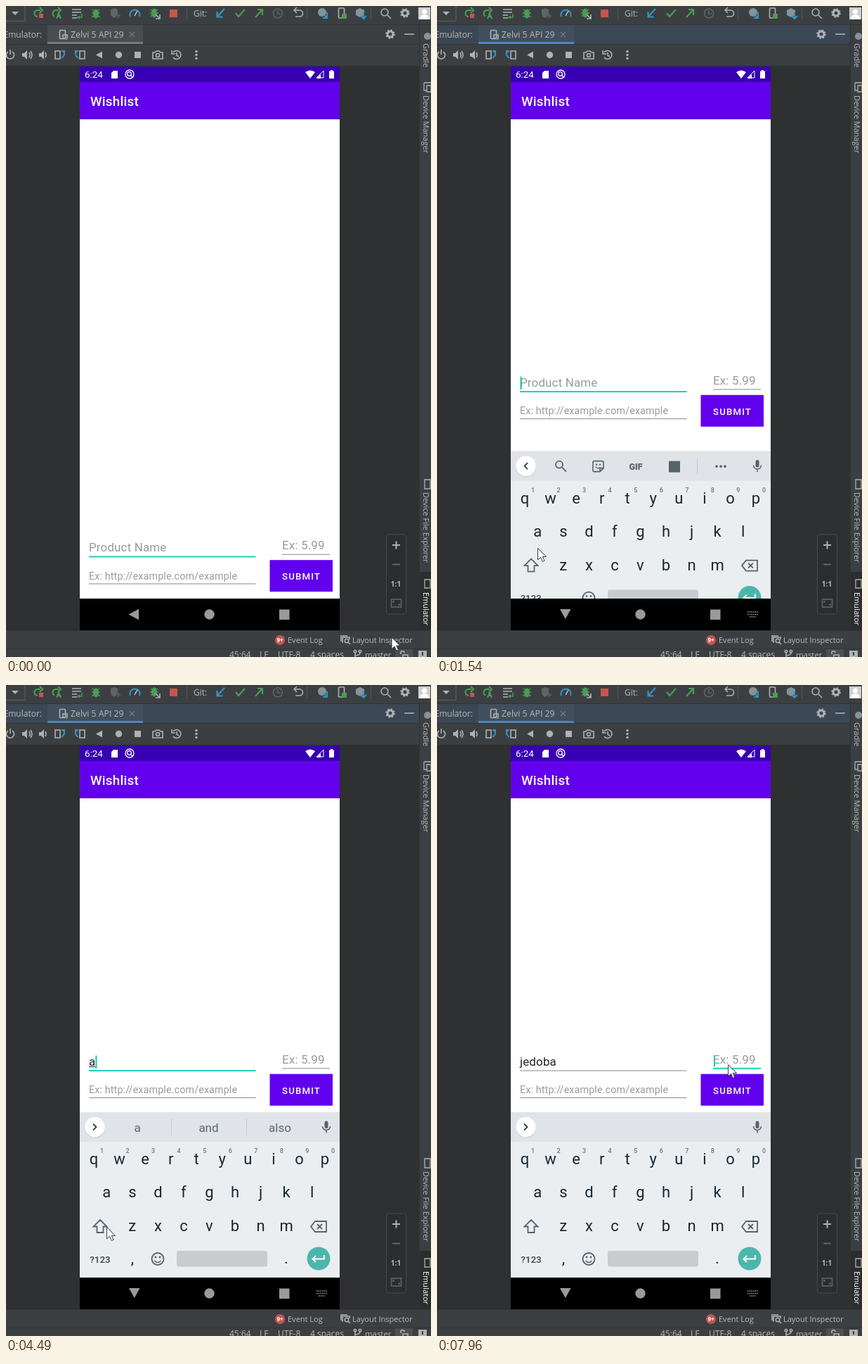
These frames come from a looping animation (605x925 px, 8 s). An HTML page:

```html
<!DOCTYPE html>
<html lang="en">
<head>
<meta charset="utf-8">
<title>Wishlist in an emulator</title>
<style>
html, body { margin: 0; width: 100%; height: 100%; overflow: hidden; background: #2e3031; }
svg { display: block; width: 605px; height: 925px; }
text { white-space: pre; }
.ide { font: 12px "Open Sans", "Noto Sans", sans-serif; fill: #bbb; }
.small { font-size: 11px; }
.app { font: 16.95px Roboto, sans-serif; letter-spacing: .009375em; }
.hint { fill: #9a9a9a; }
.key { font: 22px Roboto, sans-serif; fill: #18262f; text-anchor: middle; }
.num { font: 500 9px Roboto, sans-serif; fill: #6a747b; text-anchor: middle; }
.sug { font: 17px Roboto, sans-serif; fill: #5b666d; text-anchor: middle; }
.line { fill: none; stroke: #afb1b3; stroke-width: 1.6; }
.green { stroke: #499c54; stroke-width: 2; }
.blue { stroke: #3592c4; stroke-width: 2; }
.dim { stroke: #616365; }
.solid { fill: #afb1b3; }
.kb { fill: none; stroke: #56626a; stroke-width: 1.8; }
</style>
</head>
<body>
<svg viewBox="0 0 605 925">
  <rect width="605" height="925" fill="#2e3031"/>

  <!-- main toolbar -->
  <rect width="605" height="26" fill="#3c3f41"/>
  <path d="M0 21.5H27V0" class="line" style="stroke:#5e6162;stroke-width:1"/>
  <path d="M8 8h10l-5 5z" class="solid"/>
  <g class="line green">
    <path d="M49 6h-4a4.5 4.5 0 0 0 0 9M48 2l4 4-4 4M75 6h-4a4.5 4.5 0 0 0-2 8.500M74 2l4 4-4 4M72 18l3-8 3 8M73 15h4"/>
    <path d="M123 5l3 2M133 5l-3 2M122 10h12M122 15h12M206 5l3 2M216 5l-3 2M205 10h12M206 14h4" stroke-width="1.500"/>
  </g>
  <rect x="47" y="11" width="6" height="6" fill="#c75450"/>
  <path d="M94 5h13M94 9h13M94 13h7M94 17h7" class="line"/>
  <path d="M108 11v5h-5M105 14l-3 2 3 2" class="line green" style="stroke-width:1.500"/>
  <ellipse cx="128" cy="11" rx="4" ry="6.500" fill="#499c54"/>
  <path d="M149 5l5-2 5 2v5q-1 5-5 7-5-2-5-7z" fill="#616365"/><path d="M158 10l6 4-6 4z" fill="#55585a"/>
  <path d="M177 15a7 7 0 1 1 13 0" class="line blue"/><path d="M183 14l4-7" class="line"/>
  <ellipse cx="211" cy="10" rx="4" ry="6.500" fill="#499c54"/>
  <path d="M219 12v6h-6M219 18l-6-6" class="line"/>
  <rect x="233" y="5" width="11" height="11" fill="#c75450"/>
  <path d="M257.500 2v17M428.500 2v17M519.500 2v17" stroke="#55585a"/>
  <text class="ide" x="267" y="15">Git:</text>
  <path d="M311 4l-10 11M300.500 8v7.500h8" class="line blue" style="stroke-width:2.200"/>
  <path d="M327 10l4 5 9-10M355 16l10-11M358 5h7v8" class="line green" style="stroke-width:2.200"/>
  <g class="line dim"><circle cx="387" cy="10.500" r="6.500"/><path d="M387 6v5h4"/></g>
  <path d="M412 15h6a4 4 0 0 0 0-9h-7M414 2l-4 4 4 4" class="line"/>
  <circle cx="450" cy="9" r="6" fill="#87939a"/><path d="M457 9v8h-6M457 17l-5-5" class="line blue"/>
  <rect x="473.500" y="3" width="8" height="14" rx="1" class="line"/><rect x="478" y="11" width="7" height="7" fill="#499c54"/>
  <path d="M498 6l6-3 6 3v7l-6 3-6-3z" fill="#87939a"/><path d="M509 9v9M505 14l4 4 4-4" class="line blue"/>
  <g class="line" stroke-width="2"><circle cx="539" cy="9" r="5"/><path d="M543 13l5 5"/></g>
  <use href="#gear" x="568" y="10"/>
  <rect x="587" y="2" width="17" height="17" fill="#cfcfcf"/><circle cx="595.500" cy="8" r="3.500" fill="#fff"/><path d="M589 19q0-7 6.500-7t6.500 7z" fill="#fff"/>

  <!-- emulator window header -->
  <rect id="head" y="27" width="588" height="27"/>
  <rect id="tab" x="59" y="27" width="136" height="24"/>
  <rect id="mark" x="59" y="51" width="136" height="3"/>
  <text class="ide" x="51" y="45" text-anchor="end">Emulator:</text>
  <g class="line" stroke-width="1.300"><rect x="76.500" y="34.500" width="8" height="12" rx="1"/><path d="M81 41h6v5h-6z"/></g>
  <path d="M84 47h4" class="line green"/>
  <text class="ide" x="92" y="45" style="font-size:12.300px">Zelvi 5 API 29</text>
  <path d="M176 37l7 7M183 37l-7 7" class="line" style="stroke:#777a7c;stroke-width:1.200"/>
  <g id="gear" class="line" transform="translate(0 0)"><circle r="4" stroke-width="3"/><circle r="5.800" stroke-width="2" stroke-dasharray="2.200 2.350"/></g>
  <use href="#gear" x="547" y="40"/>
  <path d="M567 40h14" class="line"/>

  <!-- emulator controls -->
  <rect y="54" width="588" height="31" fill="#3c3f41"/><path d="M0 54.500H588M0 85H588" stroke="#323435"/>
  <path d="M3 65a5.500 5.500 0 1 0 6 0M6 62v7M33 66q2 3.500 0 7M35 64q4 5.500 0 11M56 66q2 3.500 0 7" class="line"/>
  <path id="spk" d="M23 67h3l4-4v13l-4-4h-3z" class="solid"/><use href="#spk" x="24"/>
  <rect x="70" y="64" width="7" height="11" class="line"/><path d="M79 74q7-5 2-10M79 64h4v4" class="line blue"/>
  <rect x="105" y="64" width="7" height="11" class="line"/><path d="M103 74q-7-5-2-10M103 64h-4v4" class="line blue"/>
  <path d="M128 69.500l9-5v10zM183 65h9v9h-9z" class="solid"/><circle cx="160.500" cy="69.500" r="4.700" class="solid"/>
  <path d="M209 66h3l2-2h4l2 2h3v9h-14z" class="line"/><circle cx="216" cy="70" r="2.500" class="line"/>
  <path d="M238 66a6 6 0 1 1 0 7M236 63v5h5M243 66v4l3 2" class="line"/>
  <g class="solid"><circle cx="271" cy="64.500" r="1.700"/><circle cx="271" cy="69.500" r="1.700"/><circle cx="271" cy="74.500" r="1.700"/></g>

  <!-- right stripe -->
  <rect x="588" y="27" width="17" height="860" fill="#3c3f41"/><rect x="588" y="804" width="17" height="83" fill="#2b2d2e"/>
  <path d="M588.500 22v865M0 26.500H605" stroke="#313334"/>
  <circle cx="600" cy="43" r="5" fill="#87939a"/>
  <g class="line"><path d="M595 109h10M595 109v11h4M599 113h6v9h-6zM596 673h8v13h-8zM596 815h8v12h-8z" stroke-width="1.300"/></g>
  <path d="M601 827h4" class="line green"/>
  <g id="side" class="ide small"></g>

  <!-- zoom panel -->
  <rect x="541.500" y="751" width="28" height="113" rx="3" fill="#2b2d2e" stroke="#484b4d"/>
  <path d="M550 766h11M555.500 760.500v11" class="line" style="stroke-width:2"/>
  <path d="M550 793.500h11" class="line dim" style="stroke-width:2"/>
  <text class="ide" x="555" y="825" text-anchor="middle" style="font-size:10px;font-weight:700">1:1</text>
  <g class="line dim" stroke-width="1.300"><rect x="548.500" y="843" width="14" height="11"/><path d="M551 848v-2h2M560 849v2h-2"/></g>

  <!-- status bar -->
  <rect y="887" width="605" height="38" fill="#3c3f41"/><path d="M0 887.500H605M0 913.500H605" stroke="#323435"/>
  <circle cx="390" cy="901" r="7" fill="#c75450"/>
  <text x="390" y="904" text-anchor="middle" fill="#fff" style="font:700 8px 'Open Sans',sans-serif">9+</text>
  <text class="ide small" x="401" y="905">Event Log</text>
  <g class="line" stroke-width="1.200"><path d="M477 903v-8h9M479 905v-8h10v3"/><circle cx="485" cy="902" r="2.700"/><path d="M487 904l3 3"/></g>
  <text class="ide small" x="493" y="905">Layout Inspector</text>
  <g class="ide"><text x="318" y="926">45:64</text><text x="361" y="926">LF</text><text x="387" y="926">UTF-8</text><text x="433" y="926">4 spaces</text><text x="511" y="926" style="font-size:11.400px">master</text></g>
  <g class="line" stroke-width="1.300"><circle cx="497" cy="917" r="1.700"/><circle cx="504" cy="917" r="1.700"/><path d="M497 919v6M504 919q0 3-6 4"/></g>
  <rect x="554" y="914" width="25" height="11" fill="#4c5052"/>
  <path d="M562 921v-2a2.500 2.500 0 0 1 5 0M565 922h7v4h-7z" class="line"/>
  <path d="M587 916h12v9h-12z" class="solid"/><path d="M593 918v5" stroke="#3c3f41" stroke-width="2"/>

  <!-- phone -->
  <rect x="105" y="86" width="370" height="756" fill="#fff"/>
  <rect x="105" y="86" width="370" height="22.500" fill="#3700b3"/>
  <rect x="105" y="108" width="370" height="53" fill="#6200ee"/>
  <g fill="#fff">
    <text x="112" y="102" style="font:13.400px Roboto,sans-serif">6:24</text>
    <path d="M153 92h6v11h-9v-8zM426 94q7-5 14 0l-7 9zM463 91h-1v1.500h-2v10.500h7V92.500h-2V91z"/>
    <path d="M452 92v10h-10z" fill="none" stroke="#fff"/><path d="M448 97v6h-6z"/>
    <g fill="none" stroke="#fff" stroke-width="1.300"><circle cx="176" cy="97" r="6"/><circle cx="175.500" cy="96.500" r="2.800"/><path d="M177 98l4 4"/></g>
    <text x="120" y="142" style="font:500 18.840px Roboto,sans-serif;letter-spacing:.0125em">Wishlist</text>
  </g>
  <g id="form">
    <text id="name" class="app" x="118" y="775"></text>
    <rect id="under" x="118" y="776.500" height="1" fill="#222"/>
    <rect id="nameLine" x="118" width="237.500"/>
    <text class="app hint" x="118" y="814.500" style="font-size:14.300px">Ex: http://example.com/example</text>
    <rect x="118" y="820.500" width="237.500" height="1" fill="#8a8a8a"/>
    <text class="app hint" x="393" y="772">Ex: 5.99</text>
    <rect id="priceLine" x="393" width="68"/>
    <rect id="caret" width="2" fill="#12c9b7"/>
    <rect x="375.500" y="787.200" width="89.500" height="45" fill="#6200ee"/>
    <text x="393" y="815" fill="#fff" style="font:500 13.190px Roboto,sans-serif;letter-spacing:.0893em">SUBMIT</text>
  </g>

  <!-- keyboard -->
  <clipPath id="screen"><rect x="105" y="161" width="370" height="681"/></clipPath>
  <g clip-path="url(#screen)"><g id="board">
    <rect x="105" y="607" width="370" height="235" fill="#eaeef1"/>
    <rect x="105" y="607" width="370" height="42" fill="#e0e4e8"/>
    <circle cx="126.500" cy="629" r="14.500" fill="#cdd2d6"/><circle cx="126.500" cy="628" r="14.200" fill="#fff"/>
    <path id="chev" class="kb" style="stroke:#333d43"/>
    <rect x="453.500" y="619.500" width="5" height="10.500" rx="2.500" fill="#56626a"/><path d="M450.500 627a5.500 5.500 0 0 0 11 0M456 632.500v4" class="kb" style="stroke-width:1.500"/>
    <g id="tools">
      <g class="kb"><circle cx="174" cy="626" r="5"/><path d="M178 630l6 6"/><path d="M224 621h11q2 0 2 2v8l-5 5h-8q-2 0-2-2v-11q0-2 2-2zM232 636v-5h5" stroke-width="1.600"/><path d="M226 629q3 4 6 1" stroke-width="1.400"/></g>
      <g fill="#56626a"><circle cx="227" cy="626" r="1.200"/><circle cx="232" cy="626" r="1.200"/><circle cx="398" cy="628.500" r="1.900"/><circle cx="404" cy="628.500" r="1.900"/><circle cx="410" cy="628.500" r="1.900"/>
      <rect x="330" y="621" width="16" height="16"/>
      <text x="283" y="633" text-anchor="middle" style="font:900 12.500px Roboto,sans-serif">GIF</text></g>
      <path d="M370.500 618v21" stroke="#c5cacd"/>
    </g>
    <g id="sugs">
      <path d="M235.500 616v24M342.500 616v24" stroke="#c5cacd"/>
      <text class="sug" x="187" y="635"></text><text class="sug" x="288.500" y="635"></text><text class="sug" x="390" y="635"></text>
    </g>
    <g id="keys"></g>
    <path d="M134 760l9.500 9.500h-5v8.500h-9v-8.500h-5z" class="kb"/>
    <path d="M440 762h16v15h-16l-6-7.500zM443 766l7 7M450 766l-7 7" class="kb"/>
    <text x="134" y="820.500" text-anchor="middle" fill="#38454d" style="font:500 13.500px Roboto,sans-serif">?123</text>
    <circle cx="216" cy="815.500" r="8.500" class="kb"/><path d="M211.500 818q4.500 5 9 0" class="kb" style="stroke-width:1.500"/>
    <circle cx="213" cy="813" r="1.400" fill="#56626a"/><circle cx="219" cy="813" r="1.400" fill="#56626a"/>
    <rect x="243" y="804" width="129" height="22.500" rx="3" fill="#c9ccce"/>
    <circle cx="445" cy="815" r="16.500" fill="#4db6ac"/>
    <path d="M453 810v5.500h-16M441 811l-4.500 4.500 4.500 4.500" fill="none" stroke="#fff" stroke-width="2"/>
  </g></g>

  <!-- navigation bar -->
  <rect x="105" y="842" width="370" height="45"/>
  <g fill="#9a9a9a"><path id="back"/><circle cx="289.500" cy="864.500" r="7.200"/><rect x="389" y="857.500" width="14.500" height="14.500"/>
    <path id="dots" d="M442 861h15M442 864.500h15M445 868h9" stroke="#9a9a9a" stroke-width="1.600" stroke-dasharray="1.600 1.100"/></g>

  <path id="mouse" d="M0 0V16.500L4 13 6.800 19 9.500 17.800 6.800 12H12Z" fill="#fff" stroke="#2a2a2a" stroke-width=".9"/>
</svg>
<script>
const LOOP = 8000;
const $ = id => document.getElementById(id);
const set = (el, attrs) => { for (const k in attrs) el.setAttribute(k, attrs[k]); };
const show = (el, on) => { el.style.display = on ? '' : 'none'; };

function addText(parent, cls, x, y, str) {
  const el = document.createElementNS('http://www.w3.org/2000/svg', 'text');
  set(el, { class: cls, x, y });
  el.textContent = str;
  parent.append(el);
  return el;
}

const STEP = 36.55;
[['qwertyuiop', 125, 681], ['asdfghjkl', 143.3, 728], ['zxcvbnm', 179.8, 776]].forEach(([row, x, y]) =>
  [...row].forEach((c, i) => addText($('keys'), 'key', x + i * STEP, y, c)));
[...'1234567890'].forEach((c, i) => addText($('keys'), 'num', 136.500 + i * STEP, 665, c));
addText($('keys'), 'key', 180, 822, ',');
addText($('keys'), 'key', 399, 822, '.');

[['Gradle', 53], ['Device Manager', 127], ['Device File Explorer', 691], ['Emulator', 833]].forEach(([s, y]) => {
  const el = addText($('side'), 'ide small', 0, 0, s);
  el.setAttribute('transform', `translate(594 ${y}) rotate(90)`);
  if (s === 'Emulator') el.style.fill = '#fff';
});

// The gear symbol is only a template at the corner; keep it out of view there.
const gear = $('gear');
const defs = document.createElementNS('http://www.w3.org/2000/svg', 'defs');
gear.before(defs);
defs.append(gear);

const FOCUS = 1010, RESIZE = 1420, SLIDE = [1340, 1640], PRICE = 7740;
const MOUSE = [
  [0, 549, 897], [70, 549, 897], [200, 566, 906], [330, 520, 820], [480, 380, 640],
  [600, 240, 578], [720, 95, 650], [870, 143.5, 770.5], [6600, 143.5, 770.5], [6700, 290, 695],
  [6880, 461.5, 587.5], [7000, 516, 545], [7290, 449, 580], [7420, 449, 580], [7690, 414.5, 539.5]
];
const TYPED = [[0, ''], [3550, 'a'], [4620, ''], [4890, 'j'], [5150, 'je'], [5280, 'jed'], [5420, 'jedo'], [5550, 'jedob'], [5810, 'jedoba']];
const BLINK = [[0, 0], [FOCUS, 1], [1560, 0], [2060, 1], [2560, 0], [3020, 1], [3550, 1], [4010, 0], [4490, 1], [6270, 0], [6770, 1], [7270, 0], [PRICE, 1]];
const HINTS = { a: ['a', 'and', 'also'], j: ['j', 'just', 'job'], je: ['je', 'jet', 'jelly'] };

const last = (table, t) => table.filter(r => r[0] <= t).pop();

function mouseAt(t) {
  const i = MOUSE.findIndex(r => r[0] > t);
  if (i < 0) return MOUSE[MOUSE.length - 1].slice(1);
  const [t0, x0, y0] = MOUSE[i - 1], [t1, x1, y1] = MOUSE[i];
  const k = (t - t0) / (t1 - t0);
  return [x0 + (x1 - x0) * k, y0 + (y1 - y0) * k];
}

function fieldLine(el, y, active) {
  set(el, { y: active ? y - .5 : y, height: active ? 2 : 1, fill: active ? '#1bd0be' : '#8a8a8a' });
}

function draw(t) {
  const focus = t >= FOCUS, price = t >= PRICE, open = t >= SLIDE[0];
  const [, text] = last(TYPED, t);

  set($('head'), { fill: focus ? '#3b4754' : '#3c3f41' });
  set($('tab'), { fill: focus ? '#414e5b' : '#4a4d4f' });
  set($('mark'), { fill: focus ? '#4a88c7' : '#747a80' });

  set($('form'), { transform: `translate(0 ${t >= RESIZE ? -234.5 : 0})` });
  const name = $('name');
  name.textContent = text || 'Product Name';
  set(name, { fill: text ? '#222' : '#9a9a9a' });
  const width = text ? name.getComputedTextLength() : 0;
  set($('under'), { width: price ? 0 : width });
  fieldLine($('nameLine'), 782, !price);
  fieldLine($('priceLine'), 778.8, price);
  set($('caret'), price ? { x: 394, y: 760.5, height: 16 } : { x: 118.5 + Math.max(0, width - .5), y: 761, height: 18.5 });
  show($('caret'), last(BLINK, t)[1]);

  const k = Math.min(1, Math.max(0, (t - SLIDE[0]) / (SLIDE[1] - SLIDE[0])));
  set($('board'), { transform: `translate(0 ${235 * (1 - k) ** 2})` });
  show($('board'), open);
  show($('dots'), open);
  set($('back'), { d: open ? 'M175 857h15.500l-7.700 14z' : 'M174.500 864.500l14.500-7.700v15.500z' });

  const tools = !text && !(t >= 4620 && t < 4680);
  const sugs = !tools && !price;
  show($('tools'), tools);
  show($('sugs'), sugs);
  set($('chev'), { d: tools ? 'M129 623.500l-4.500 4.500 4.500 4.500' : 'M124 623.500l4.500 4.500-4.500 4.500' });
  const words = HINTS[text || 'a'] || [text, 'jEdoba', 'jEdobas'];
  document.querySelectorAll('#sugs text').forEach((el, i) => {
    const bold = i === 1 && text.length > 2;
    el.textContent = words[i];
    el.style.fontWeight = bold ? 700 : 400;
    el.style.fill = bold ? '#000' : '';
  });

  set($('mouse'), { transform: `translate(${mouseAt(t)})` });
}

const start = performance.now();
function tick() {
  draw((performance.now() - start) % LOOP);
  requestAnimationFrame(tick);
}
tick();
</script>
</body>
</html>
```
